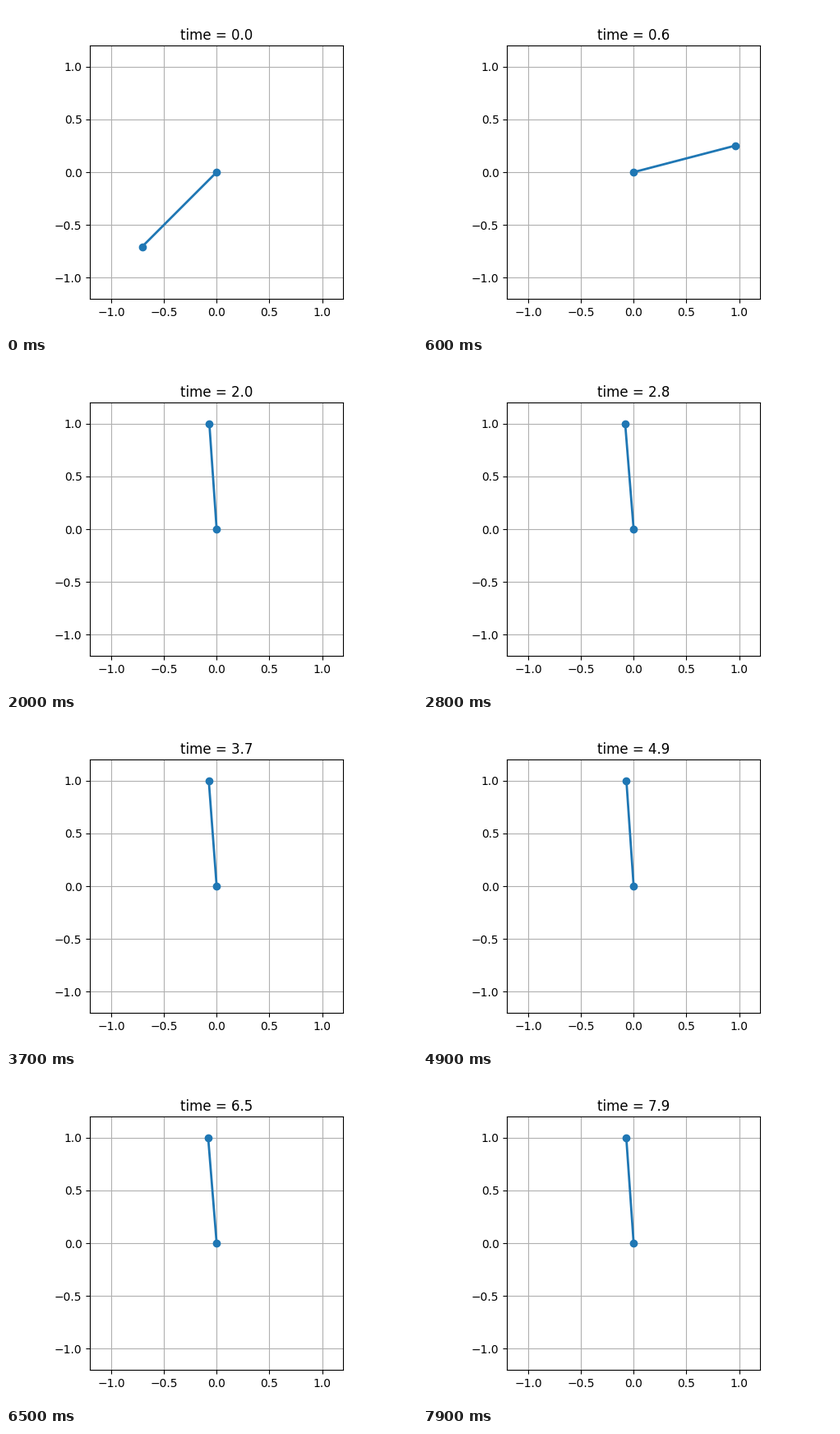
Write a matplotlib script that moves like this. It is 500 by 400 pixels and loops after 8 s.

```python
import numpy as np
import matplotlib.pyplot as plt
from matplotlib.animation import FuncAnimation

FRAMES, DT = 80, 0.1
START, REST = -45, 184.25   # degrees, counter-clockwise from straight down
SWAY, PERIOD = 0.35, 3.7


def angle(t):
    """Swing up past the right side, then sway slightly beyond the top."""
    left = np.exp(-2.28 * t ** 1.5)
    sway = SWAY * np.cos(2 * np.pi * (t - 2.8) / PERIOD)
    return np.radians(START * left + (REST + sway) * (1 - left))


fig, ax = plt.subplots(figsize=(5, 4), dpi=100)
ax.set_aspect("equal")
ax.set_xlim(-1.2, 1.2)
ax.set_ylim(-1.2, 1.2)
ax.grid()
rod, = ax.plot([], [], "o-", lw=2)
title = ax.set_title("time = 0.0", pad=5.3)


def update(frame):
    t = frame * DT
    a = angle(t)
    rod.set_data([0, np.sin(a)], [0, -np.cos(a)])
    title.set_text(f"time = {t:.1f}")
    return rod, title


anim = FuncAnimation(fig, update, frames=FRAMES, interval=1000 * DT,
                     repeat=True, repeat_delay=0)
plt.show()
```
